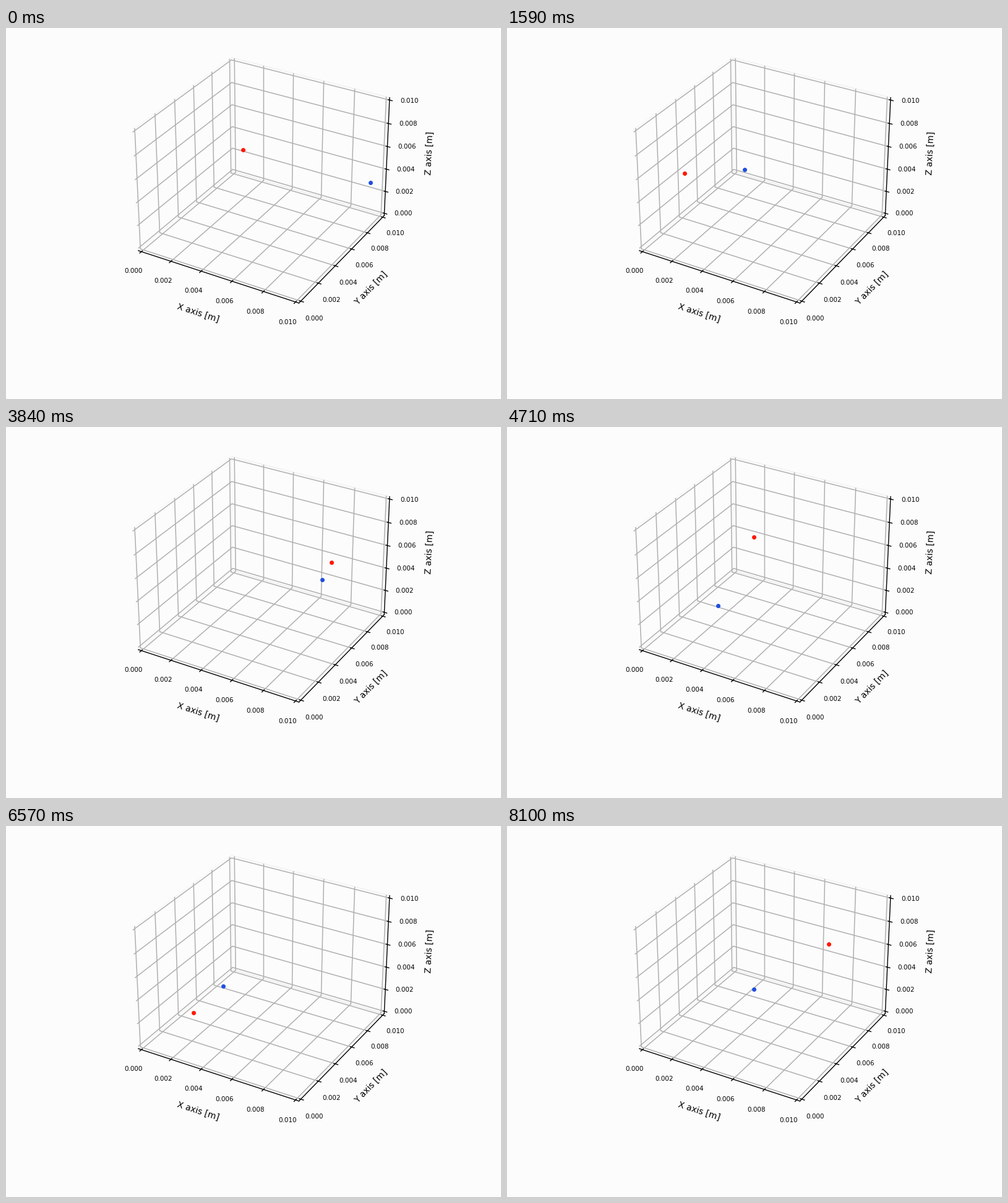
A matplotlib script for the animation above (8130 ms loop, 800 by 600 pixels).

```python
import numpy as np
import matplotlib.pyplot as plt
from matplotlib.animation import FuncAnimation

FRAMES, STEP_MS = 271, 30
SIZE = 0.01  # edge of the cube in metres
BG = "#fcfcfc"

plt.rcParams.update({"grid.linewidth": 1.1, "axes.linewidth": 1.0,
                     "xtick.major.width": 1.0, "ytick.major.width": 1.0})


def fold(u):
    """Reflect an unbounded coordinate back into 0..1."""
    return 1 - np.abs(u % 2 - 1)


def flight(start, middle, end, speed):
    """Bounce off the walls through three points at nearly constant speed."""
    times = (0, 128, FRAMES - 1)
    line = [np.array(start)]
    for point, dt in zip((middle, end), np.diff(times)):
        goal = line[-1] + np.array(speed) * dt
        images = [p + 2 * np.round((goal - p) / 2)
                  for p in (np.array(point), -np.array(point))]
        near = np.abs(images[0] - goal) < np.abs(images[1] - goal)
        line.append(np.where(near, *images))
    t = np.arange(FRAMES)
    return SIZE * np.array([fold(np.interp(t, times, u))
                            for u in np.transpose(line)])


red = flight((0.366, 0.5, 0.663), (0.827, 0.7, 0.588), (0.853, 0.6, 0.811),
             speed=(0.062, 0.035, 0.050))
blue = flight((0.980, 0.9, 0.346), (0.823, 0.6, 0.503), (0.430, 0.5, 0.325),
              speed=(0.055, 0.040, 0.060))

fig = plt.figure(figsize=(8, 6), dpi=100, facecolor=BG)
ax = fig.add_subplot(projection="3d", facecolor=BG)
fig.subplots_adjust(left=0.125, right=0.9, bottom=0.21, top=0.98)

dots = [(ax.plot([], [], [], "o", ms=4, color=color)[0], path)
        for color, path in (("#ff1800", red), ("#1f4fe0", blue))]

margin = SIZE / 48
lim = (-margin, SIZE + margin)
ticks = np.linspace(0, SIZE, 6)
ax.set(xlim=lim, ylim=lim, zlim=lim, xticks=ticks, yticks=ticks, zticks=ticks)
ax.tick_params(labelsize=7.5, pad=6)
for axis, name in zip((ax.xaxis, ax.yaxis, ax.zaxis), "XYZ"):
    axis.set_label_text(f"{name} axis [m] ")
    axis.labelpad = 10
    axis.pane.set_fill(False)


def update(i):
    for dot, path in dots:
        dot.set_data_3d(*path[:, i:i + 1])
    return [dot for dot, _ in dots]


anim = FuncAnimation(fig, update, frames=FRAMES, interval=STEP_MS,
                     repeat=True, repeat_delay=0, blit=False)
plt.show()
```
